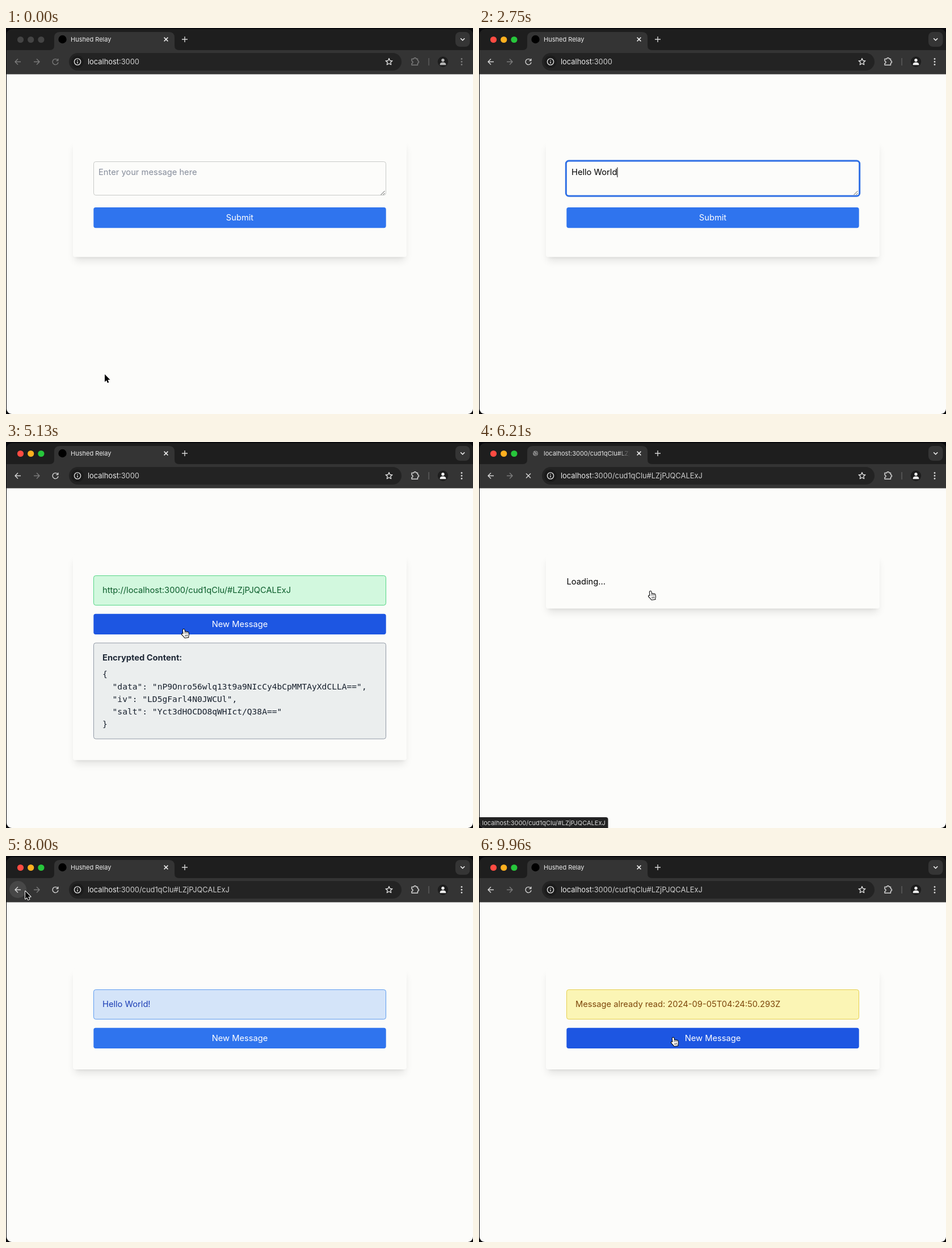
These frames come from a looping animation (823x680 px, 10000 ms). An HTML page with a canvas:

```html
<!DOCTYPE html>
<html lang="en">
<head>
<meta charset="utf-8">
<title>Message form</title>
<style>
html, body { margin: 0; width: 100%; height: 100%; overflow: hidden; background: #08080c; }
canvas { display: block; }
</style>
</head>
<body>
<canvas id="stage" width="823" height="680"></canvas>
<script>
const ctx = document.getElementById('stage').getContext('2d');
const LOOP = 10000;
const SANS = 'Inter, "Open Sans", sans-serif';
const MONO = '"DejaVu Sans Mono", monospace';
const BODY = 14.7, CODE = 14.6;
const PAGE = '#fcfcfa', ICON = '#d6d6d6', DIM = '#7b7b7b';
const TITLE = 'Hushed Relay', HOST = 'localhost', ROUTE = '/cud1qClu', HASH = '#LZjPJQCALExJ';

// time, x, y of the pointer's hot spot
const PATH = [
  [40, 174, 610], [1000, 290, 262], [3420, 290, 262], [3900, 277, 323], [4240, 277, 323],
  [5130, 313, 330], [5300, 313, 330], [5720, 302, 263], [7380, 302, 263], [8000, 34, 62],
  [8060, 27, 61], [8250, 27, 61], [8480, 54, 61], [8800, 54, 61], [9380, 318, 306],
  [9500, 318, 306], [9900, 342, 320]
];
const MESSAGE = 'Hello World!';
const KEYS = [1360, 1460, 1580, 1700, 1790, 1960, 2210, 2330, 2460, 2580, 2700, 2960];
const VIEWS = [
  [0, 'form'], [4040, 'sent'], [5960, 'loading'], [6540, 'message'],
  [8200, 'form'], [8700, 'loading'], [9050, 'read']
];
const CARD_BOTTOM = { form: 403.5, sent: 560.5, loading: 293.5, message: 376, read: 376 };

function pointer(t) {
  const i = PATH.findIndex(p => p[0] > t);
  if (i === 0) return PATH[0].slice(1);
  if (i < 0) return PATH[PATH.length - 1].slice(1);
  const [t0, x0, y0] = PATH[i - 1], [t1, x1, y1] = PATH[i];
  const u = (t - t0) / (t1 - t0), k = u * u * (3 - 2 * u);
  return [x0 + (x1 - x0) * k, y0 + (y1 - y0) * k];
}

const within = ([px, py], x, y, w, h) => px >= x && px <= x + w && py >= y && py <= y + h;
const overLink = (view, at) => view === 'sent' && within(at, 170, 252, 331, 18);

function box(x, y, w, h, r, fill, stroke, width = 1) {
  ctx.beginPath();
  ctx.roundRect(x, y, w, h, r);
  if (fill) { ctx.fillStyle = fill; ctx.fill(); }
  if (stroke) { ctx.strokeStyle = stroke; ctx.lineWidth = width; ctx.stroke(); }
}

const dot = (x, y, r, fill, stroke, width) => box(x - r, y - r, 2 * r, 2 * r, r, fill, stroke, width);

function text(s, x, y, size, color, { font = SANS, weight = 400, align = 'left' } = {}) {
  ctx.font = `${weight} ${size}px ${font}`;
  ctx.textAlign = align;
  ctx.fillStyle = color;
  ctx.fillText(s, x, y);
  return x + ctx.measureText(s).width;
}

function shape(d, x, y, { fill, stroke, width = 1.4, turn = 0 }) {
  const p = new Path2D(d);
  ctx.save();
  ctx.translate(x, y);
  ctx.rotate(turn);
  ctx.lineJoin = 'round';
  if (stroke) { ctx.strokeStyle = stroke; ctx.lineWidth = width; ctx.stroke(p); }
  if (fill) { ctx.fillStyle = fill; ctx.fill(p); }
  ctx.restore();
}

const line = (d, x, y, stroke, width) => shape(d, x, y, { stroke, width });

function tabStrip(active, loading) {
  box(0, 0, 823, 39, 0, '#1e1e1e');
  ['#ff4b42', '#ffb01f', '#27c63b'].forEach((c, i) => dot(25.5 + 18.2 * i, 20.5, 5.6, active ? c : '#444'));
  shape('M77 39q8 0 8-8V17q0-10 10-10H287q10 0 10 10V31q0 8 8 8Z', 0, 0, { fill: '#343434' });
  if (loading) {
    dot(99.5, 20, 4.6, '#8b8b8b');
    line('M-4-1.5Q0 0-1 3M0-4Q1-1 4 0M1 4l1-3', 99.5, 20, '#444', 1.1);
    const fade = ctx.createLinearGradient(246, 0, 266, 0);
    fade.addColorStop(0, '#e6e6e6');
    fade.addColorStop(1, '#e6e6e600');
    ctx.save();
    ctx.beginPath();
    ctx.rect(110, 7, 156, 30);
    ctx.clip();
    text(HOST + ':3000' + ROUTE + HASH, 114, 24, 11, fade);
    ctx.restore();
  } else {
    dot(99.5, 20, 7.2, '#000');
    text(TITLE, 114, 24, 11, '#ececec');
  }
  line('M-3.4-3.4 3.4 3.4M3.4-3.4-3.4 3.4', 282, 20, '#ececec', 1.5);
  line('M-5 0H5M0-5V5', 315, 20, ICON);
  box(792, 7, 25.5, 26, 8, '#353535');
  line('M-3.5-1.7 0 1.8 3.5-1.7', 804.7, 20, '#f0f0f0', 1.6);
}

function toolbar(active, loading, view, t, at) {
  const tone = active ? ICON : DIM;
  box(0, 39, 823, 42.4, 0, '#343434');
  const backForm = view === 'form' && t > 8000;
  [21, 54, 87].forEach((x, i) => {
    const usable = i !== 1 || backForm;
    if (usable && within(at, x - 15, 44, 30, 30)) dot(x, 59, 15, '#474747');
  });
  line('M5 0H-5M0-5-5 0 0 5', 21, 59.5, tone);
  line('M-5 0H5M0-5 5 0 0 5', 54, 59.5, backForm ? tone : DIM);
  line(loading ? 'M-4-4 4 4M4-4-4 4' : 'M4.3-2.5A5 5 0 1 0 5 .8M4.8-5.5v3.6H1.2', 87, 59.5, tone);

  box(111, 44, 586, 31, 15.5, '#232323');
  dot(126, 59.5, 11, '#1b1b1b');
  dot(126, 59.5, 5.6, null, '#e2e2e2', 1.4);
  line('M0-3v1.4M0-.4V3', 126, 59.5, '#e2e2e2', 1.4);
  const end = text(HOST, 144, 64, 12.87, '#ededed');
  const deep = view === 'message' || view === 'read' || loading;
  text(':3000' + (deep ? ROUTE + HASH : ''), end, 64, 12.87, '#cfcfcf');

  line('M0-6 1.7-2 6-1.7 2.7 1 3.7 5.2 0 3-3.7 5.2-2.7 1-6-1.7-1.7-2Z', 675, 59.5, '#e2e2e2', 1.3);
  line('M-6-4.5H-2.2a2 2 0 0 1 4 0H4.5V-1.2a2 2 0 0 1 0 4V6.3H-6V3.2a2 2 0 0 0 0-4Z', 721, 59, tone, 1.4);
  box(744.5, 53, 1.2, 13, 0, '#666');
  dot(770, 59.5, 9.2, '#1d1d1d');
  const person = active ? '#f1f1f1' : '#b5b5b5';
  dot(770, 56.8, 2.7, person);
  shape('M-5.3 0Q-5.3-3.6 0-3.6T5.3 0V1.3H-5.3Z', 770, 64, { fill: person });
  [-5, 0, 5].forEach(d => dot(803, 59.5 + d, 1.4, tone));
}

function card(bottom) {
  const x = 118, y = 198, w = 588, h = bottom - y;
  for (const [inset, drop, blur] of [[2.8, 9.2, 13.8], [3.7, 3.7, 5.5]]) {
    ctx.save();
    ctx.shadowColor = 'rgba(0,0,0,.1)';
    ctx.shadowOffsetY = drop;
    ctx.shadowBlur = blur;
    box(x + inset, y + inset, w - 2 * inset, h - 2 * inset, 4, PAGE);
    ctx.restore();
  }
  box(x, y, w, h, 4, PAGE);
}

function button(label, y, at) {
  box(154.3, y, 515.4, 36.3, 3.7, within(at, 154, y, 515, 36) ? '#1d56e2' : '#2f74ee');
  text(label, 412, y + 23.4, BODY, '#fff', { align: 'center' });
}

function notice(s, fill, border, color) {
  box(154.5, 235.5, 515, 52, 3.7, fill, border);
  text(s, 170, 266.4, BODY, color);
}

function form(t, at) {
  const first = t < 4040, focused = first && t >= 1040;
  const typed = first ? KEYS.filter(k => k <= t).length : 0;
  if (focused) box(153.3, 234, 517.4, 62, 5, PAGE, '#2f6fe4', 3);
  else box(154.5, 235.5, 515, 59, 3.7, PAGE, '#c8cac8');
  line('M-3.5 3.5 3.5-3.5M.5 3.5l3-3', 664, 290.5, '#555', 1);
  const end = typed
    ? text(MESSAGE.slice(0, typed), 163, 259.3, BODY, '#000')
    : (text('Enter your message here', 163, 259.3, BODY, '#868d9b'), 163);
  const since = t - (typed ? KEYS[typed - 1] : 1040);
  if (focused && Math.floor(since / 500) % 2 === 0) box(end, 245.5, 1, 17.5, 0, '#000');
  button('Submit', 316, at);
}

function sent(at) {
  notice('http://' + HOST + ':3000' + ROUTE + '/' + HASH, '#d2f8de', '#55d685', '#0a5c2a');
  button('New Message', 302.7, at);
  box(154.5, 354, 515, 169, 3.7, '#ebeeee', '#929aa6');
  text('Encrypted Content:', 170, 385.2, BODY, '#1f2937', { weight: 700 });
  [
    '{',
    '  "data": "nP9Onro56wlq13t9a9NIcCy4bCpMMTAyXdCLLA==",',
    '  "iv": "LD5gFarl4N0JWCUl",',
    '  "salt": "Yct3dHOCDO8qWHIct/Q38A=="',
    '}'
  ].forEach((s, i) => text(s, 170, 414 + 22.05 * i, CODE, '#18212e', { font: MONO }));
}

function content(view, t, at) {
  card(CARD_BOTTOM[view]);
  if (view === 'form') form(t, at);
  else if (view === 'sent') sent(at);
  else if (view === 'loading') text('Loading...', 154.5, 251, BODY, '#000');
  else {
    if (view === 'message') notice(MESSAGE, '#d4e4f9', '#5f9df0', '#1a3cb4');
    else notice('Message already read: 2024-09-05T04:24:50.293Z', '#fbf5b5', '#e6cf4e', '#7d460a');
    button('New Message', 302.7, at);
  }
}

function drawPointer(kind, [x, y]) {
  if (kind === 'hand') {
    const hand = 'M-1.4 1.3a1.4 1.4 0 0 1 2.8 0V5q1.3-.8 2.3.3 1.4-.6 2.1.6 1.9-.3 1.9 1.5v3q0 1.5-1 2.8V15H.3Q-.6 13-3 10q-1.7-1.9-.6-2.7 1-.5 2.2.8Z';
    shape(hand, x, y, { fill: '#fff', stroke: '#000', width: 2, turn: -.12 });
    shape('M1.4 5V8M3.7 5.6V8M5.8 6.4V8.4M1.6 10v3M3.5 10v3M5.4 10v3', x, y, { stroke: '#000', width: .7, turn: -.12 });
  } else if (kind === 'beam') {
    line('M-2.5-7.5Q0-7.5 0-6V6Q0 7.5-2.5 7.5M2.5-7.5Q0-7.5 0-6M0 6Q0 7.5 2.5 7.5', x, y, '#222', 1.1);
  } else {
    shape('M0 0V13.4L3 10.7 5 15.2 7.3 14.2 5.4 9.8H9.5Z', x, y, { fill: '#000', stroke: '#fff', width: 2 });
  }
}

function pointerKind(view, t, at) {
  if (view === 'loading' && t < 7000) return 'hand';
  if (view === 'form') {
    if (within(at, 154, 316, 515, 36)) return 'hand';
    return within(at, 154, 235, 515, 60) ? 'beam' : 'arrow';
  }
  const overButton = view !== 'loading' && within(at, 154, 302.7, 515, 36.3);
  return overButton || overLink(view, at) ? 'hand' : 'arrow';
}

function draw(t) {
  const view = VIEWS.filter(v => v[0] <= t).pop()[1];
  const at = pointer(t), active = t >= 1040, loading = view === 'loading';
  ctx.fillStyle = '#08080c';
  ctx.fillRect(0, 0, 823, 680);
  ctx.save();
  ctx.beginPath();
  ctx.roundRect(1, 2, 822, 678, 9);
  ctx.clip();
  box(0, 81, 823, 600, 0, PAGE);
  tabStrip(active, loading);
  toolbar(active, loading, view, t, at);
  content(view, t, at);
  if (overLink(view, at) || (t >= 5960 && t < 6700)) {
    box(0, 661, 227.5, 20, [0, 4, 0, 0], '#232323');
    text(HOST + ':3000' + ROUTE + '/' + HASH, 5.5, 674.8, 11, '#d8d8d8');
  }
  ctx.restore();
  const hidden = t >= KEYS[0] && t < 3420;
  if (!hidden) drawPointer(pointerKind(view, t, at), at);
}

const start = performance.now();
function frame() {
  draw((performance.now() - start) % LOOP);
  requestAnimationFrame(frame);
}
frame();
</script>
</body>
</html>
```
